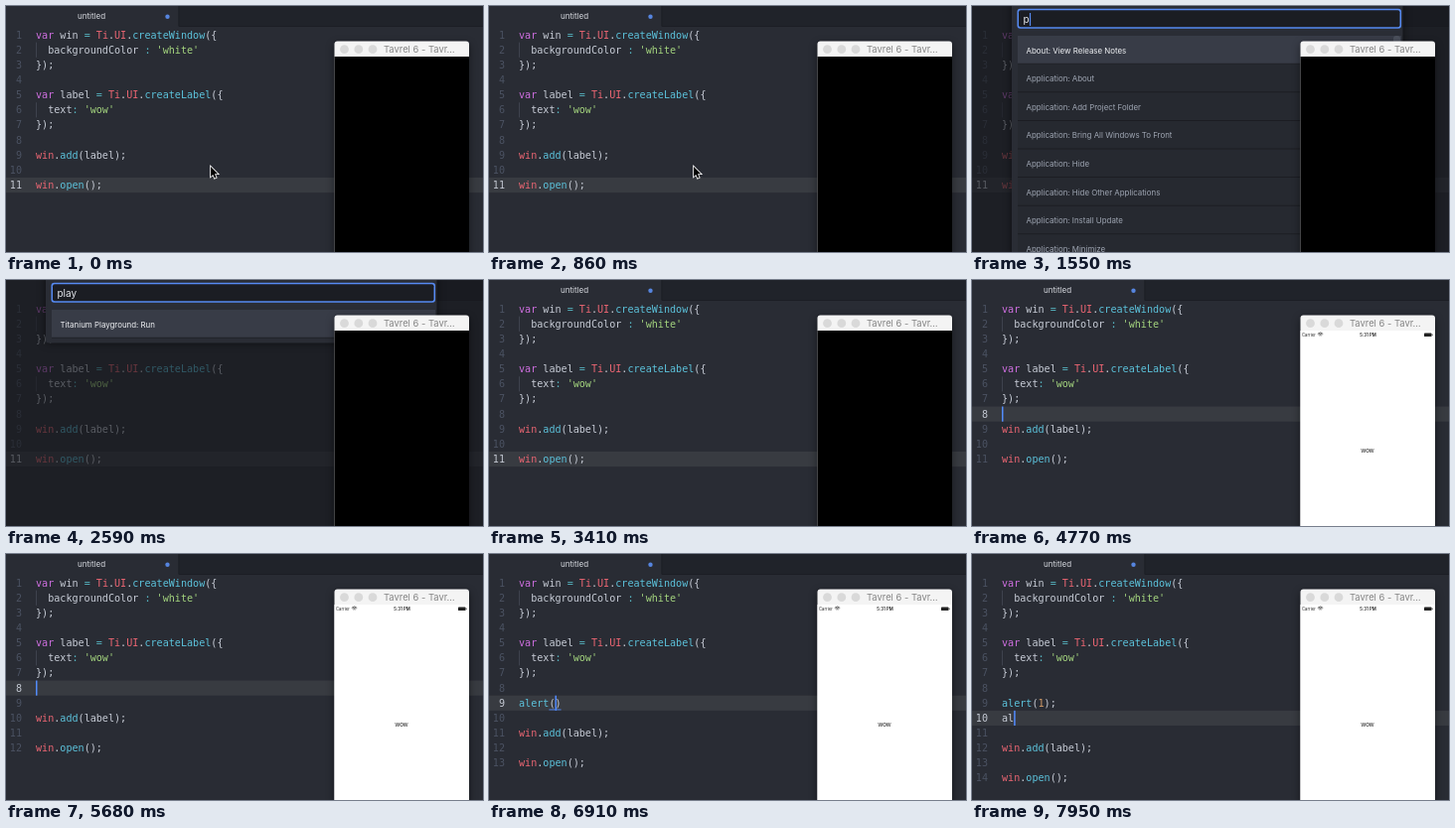
Write an HTML page with a canvas that moves like this. It is 480 px wide and 248 px high and loops after 8000 ms.

```html
<!DOCTYPE html>
<html lang="en">
<head>
<meta charset="utf-8">
<title>Editor and simulator</title>
<style>
html, body { margin: 0; width: 100%; height: 100%; overflow: hidden; background: #292c34; }
canvas { display: block; width: 480px; height: 248px; }
</style>
</head>
<body>
<canvas id="stage"></canvas>
<script>
const LOOP = 8000, W = 480, H = 248;
const LINE = 15.15, CHAR = 6.08, CODE_X = 30;
const MONO = '10.1px "DejaVu Sans Mono", monospace';
const sans = (size, weight = 400) => `${weight} ${size}px Inter, sans-serif`;

const canvas = document.getElementById('stage');
const ratio = window.devicePixelRatio || 1;
canvas.width = W * ratio;
canvas.height = H * ratio;
const ctx = canvas.getContext('2d');

const HEAD = [
  'var win = Ti.UI.createWindow({', "  backgroundColor : 'white'", '});', '',
  'var label = Ti.UI.createLabel({', "  text: 'wow'", '});'
];
const TAIL = ['win.add(label);', '', 'win.open();'];

// Each edit: time, lines between HEAD and TAIL, caret line, caret column.
const EDITS = [
  [-500, [''], 11, 0],
  [2650, [''], 11, 0],
  [4250, [''], 10, 0],
  [4410, [''], 9, 0],
  [4570, [''], 8, 0],
  [5320, ['', ''], 9, 0],
  [5500, ['', ''], 8, 0],
  [5730, ['', '', ''], 9, 0],
  ...typed(9, [[6150, 'a'], [6260, 'al'], [6370, 'ale'], [6470, 'aler'], [6570, 'alert'],
    [6780, 'alert()', 6], [7060, 'alert(1)', 7], [7210, 'alert(1)'], [7340, 'alert(1);']]),
  [7500, ['', 'alert(1);', '', ''], 10, 0],
  [7740, ['', 'alert(1);', 'a', ''], 10, 1],
  [7880, ['', 'alert(1);', 'al', ''], 10, 2]
];

function typed(line, steps) {
  return steps.map(([time, text, col = text.length]) => [time, ['', text, ''], line, col]);
}

const PALETTE_OPEN = 1000, PALETTE_CLOSE = 2650, APP_READY = 3760;
const COMMANDS = [
  'About: View Release Notes', 'Application: About', 'Application: Add Project Folder',
  'Application: Bring All Windows To Front', 'Application: Hide',
  'Application: Hide Other Applications', 'Application: Install Update', 'Application: Minimize'
];
const MATCHES = [
  'Titanium Playground: Run', 'Application: Install Update', 'Application: Hide',
  'Application: About', 'Application: Add Project Folder', 'Application: Minimize',
  'Application: Hide Other Applications', 'Pane: Split Left'
];
const QUERIES = [
  [1000, '', COMMANDS], [1480, 'p', COMMANDS], [1720, 'pl', MATCHES],
  [1860, 'pla', MATCHES.slice(0, 4)], [2000, 'play', MATCHES.slice(0, 1)]
];

const latest = (steps, t) => steps.filter(step => step[0] <= t).pop();
const blink = elapsed => elapsed % 800 < 400;
const rowTop = line => 21.5 + (line - 1) * LINE;

function rect(x, y, w, h, color) {
  ctx.fillStyle = color;
  ctx.fillRect(x, y, w, h);
}

function rounded(x, y, w, h, r, color) {
  ctx.fillStyle = color;
  ctx.beginPath();
  ctx.roundRect(x, y, w, h, r);
  ctx.fill();
}

function dot(x, y, r, color) {
  ctx.fillStyle = color;
  ctx.beginPath();
  ctx.arc(x, y, r, 0, Math.PI * 2);
  ctx.fill();
}

function text(string, x, y, font, color, align = 'left') {
  ctx.font = font;
  ctx.fillStyle = color;
  ctx.textAlign = align;
  ctx.fillText(string, x, y);
}

function drawCode(line, baseline) {
  const tokens = /('[^']*')|(\bvar\b)|(\b(?:Ti|UI)\b|^win)|(\w+(?=\())|([=:])|(\d+)|[\w]+|[^\s\w]/g;
  const colors = ['#a5d67f', '#cf6fe0', '#ec6673', '#5cc3dc', '#56b6c2', '#d19a66'];
  for (const match of line.matchAll(tokens)) {
    const kind = match.slice(1).findIndex(Boolean);
    text(match[0], CODE_X + match.index * CHAR, baseline, MONO, colors[kind] || '#c8cdd7');
  }
}

function drawEditor(t, paletteOpen) {
  const [time, middle, caretLine, caretCol] = latest(EDITS, t);
  const lines = [...HEAD, ...middle, ...TAIL];

  rect(0, 0, W, H, '#292c34');
  rect(174, 0, W - 174, 20.5, '#20232a');
  rect(173.5, 0, 0.7, 20.5, '#191b20');
  rect(174, 20, W - 174, 0.7, '#191b20');
  text('untitled', 86, 13.2, sans(8), '#d7dae0', 'center');
  dot(162.5, 10.7, 2.2, '#5685e0');

  rect(0, rowTop(caretLine), W, LINE, '#383b41');
  lines.forEach((line, i) => {
    const baseline = rowTop(i + 1) + 11;
    text(i + 1, 16, baseline, MONO, i + 1 === caretLine ? '#c3c8d2' : '#4b5262', 'right');
    if (line.startsWith('  ')) rect(CODE_X, rowTop(i + 1), 0.8, LINE, '#454a55');
    drawCode(line, baseline);
  });

  const line = lines[caretLine - 1], y = rowTop(caretLine);
  const open = line.indexOf('('), close = line.indexOf(')');
  if (open >= 0 && (caretCol === close || caretCol === close + 1)) {
    for (const col of [open, close]) rect(CODE_X + col * CHAR, y + 13.8, CHAR, 0.9, '#528bff');
  }
  if (!paletteOpen && blink(t - time)) rect(CODE_X + caretCol * CHAR, y, 1.5, LINE, '#528bff');
}

function drawPalette(t) {
  const [time, query, items] = latest(QUERIES, t);
  const pitch = 28.6, top = 30, bottom = Math.min(H, top + items.length * pitch);

  ctx.globalAlpha = Math.min(1, (t - PALETTE_OPEN) / 150);
  rect(0, 0, W, H, 'rgba(21,23,28,.62)');
  ctx.shadowColor = 'rgba(0,0,0,.5)';
  ctx.shadowBlur = 8 * ratio;
  rounded(40, -6, 393.5, bottom + 11, 3, '#2a2d35');
  ctx.shadowColor = 'transparent';

  rounded(45.5, 2.8, 386.5, 20, 3, '#568af2');
  rounded(47, 4.3, 383.5, 17, 2, '#1b1d23');
  text(query, 51.5, 16.8, sans(10), '#e4e7ec');
  const caretX = 51.8 + ctx.measureText(query).width;
  if (blink(t - time)) rect(caretX, 7, 1.2, 13, '#568af2');

  rect(46, top, 386, bottom - top, '#262930');
  items.forEach((item, i) => {
    const y = top + i * pitch;
    if (!i) rect(46, y, 386, pitch, '#383c47');
    rect(46, y + pitch - 0.8, 386, 0.8, '#191b20');
    text(item, 54.5, y + 17.5, sans(7.9), i ? '#9fa6b3' : '#f0f2f5');
  });
  if (items.length === COMMANDS.length) rounded(424, top, 7, 8, 3, '#4b505c');
  ctx.globalAlpha = 1;
}

function drawStatusBar() {
  text('Carrier', 332, 56.8, sans(4.2), '#222');
  text('5:31 PM', 398.5, 56.8, sans(4.3, 600), '#222', 'center');
  ctx.strokeStyle = '#222';
  ctx.lineWidth = 0.7;
  for (const r of [1.2, 2.5, 3.8]) {
    ctx.beginPath();
    ctx.arc(350.5, 57, r, -Math.PI * 0.75, -Math.PI * 0.25);
    ctx.stroke();
  }
  rounded(455, 53.6, 7.5, 3.5, 0.7, '#222');
  rect(462.8, 54.6, 0.7, 1.5, '#222');
}

function drawSimulator(ready) {
  ctx.shadowColor = 'rgba(0,0,0,.45)';
  ctx.shadowBlur = 9 * ratio;
  ctx.shadowOffsetY = 3 * ratio;
  rounded(330.5, 35.5, 135.5, 230, 3, '#f4f4f4');
  ctx.shadowColor = 'transparent';
  ctx.shadowOffsetY = 0;
  for (const x of [340.5, 354.8, 369]) dot(x, 43.7, 4.4, '#d9d9d9');
  text('Tavrel 6 - Tavr…', 380, 47, sans(9.4), '#858585');
  rect(330.5, 51, 135.5, H - 51, ready ? '#fff' : '#000');
  if (!ready) return;
  drawStatusBar();
  text('wow', 398, 173.8, '6.5px "Liberation Sans", sans-serif', '#222', 'center');
}

function drawPointer(x, y) {
  ctx.save();
  ctx.translate(x, y);
  const arrow = new Path2D('M0 0V10L2.3 7.9 3.9 11.6 5.6 10.9 4 7.3H7.2Z');
  ctx.lineWidth = 1.6;
  ctx.strokeStyle = '#fff';
  ctx.stroke(arrow);
  ctx.fillStyle = '#000';
  ctx.fill(arrow);
  ctx.restore();
}

function draw(t) {
  const paletteOpen = t >= PALETTE_OPEN && t < PALETTE_CLOSE;
  ctx.setTransform(ratio, 0, 0, ratio, 0, 0);
  drawEditor(t, paletteOpen);
  if (paletteOpen) drawPalette(t);
  drawSimulator(t >= APP_READY);
  if (t < PALETTE_OPEN) drawPointer(206, 162);
}

const start = performance.now();
function tick() {
  draw((performance.now() - start) % LOOP);
  requestAnimationFrame(tick);
}
tick();
</script>
</body>
</html>
```
